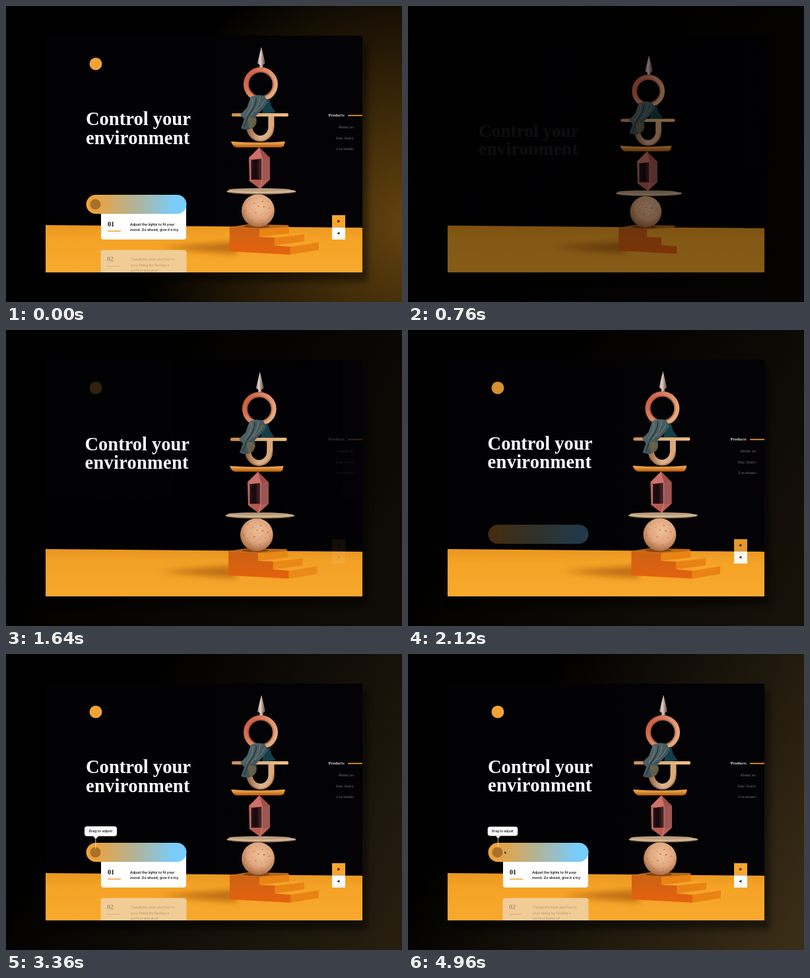
These frames come from a looping animation (600x450 px, 5000 ms). An HTML page:

```html
<!DOCTYPE html>
<html lang="en">
<head>
<meta charset="utf-8">
<title>Control your environment</title>
<style>
  html, body { margin: 0; width: 100%; height: 100%; overflow: hidden; background: #000; }
  svg { display: block; width: 600px; height: 450px; }
  .serif { font-family: "Liberation Serif", serif; font-weight: 700; }
  .sans { font: 600 5.3px Inter, sans-serif; }
  #nav { font-size: 5.6px; letter-spacing: .35px; }
  #title { font-size: 28.6px; fill: #fff; }
</style>
</head>
<body>
<svg viewBox="0 0 600 450">
  <defs>
    <clipPath id="screen"><rect x="60" y="45" width="480" height="360"/></clipPath>
    <radialGradient id="flareFill" gradientUnits="userSpaceOnUse" cx="610" cy="330" r="420">
      <stop stop-color="#64430f"/><stop offset=".4" stop-color="#64430f" stop-opacity=".6"/>
      <stop offset="1" stop-color="#64430f" stop-opacity="0"/>
    </radialGradient>
    <linearGradient id="glowFill" gradientUnits="userSpaceOnUse" x1="150" y1="120" x2="600" y2="400">
      <stop stop-color="#3a2d17" stop-opacity="0"/><stop offset="1" stop-color="#3a2d17"/>
    </linearGradient>
    <linearGradient id="night"><stop stop-color="#010102"/><stop offset="1" stop-color="#040308"/></linearGradient>
    <linearGradient id="floorFill" x2="0" y2="1">
      <stop stop-color="#e89620"/><stop offset=".12" stop-color="#f5a327"/><stop offset=".6" stop-color="#fbae33"/>
    </linearGradient>
    <linearGradient id="coneFill">
      <stop stop-color="#907c74"/><stop offset=".35" stop-color="#ead5c7"/><stop offset="1" stop-color="#51403c"/>
    </linearGradient>
    <linearGradient id="ringFill" x2="1" y2=".6">
      <stop stop-color="#c95338"/><stop offset=".45" stop-color="#dc8464"/><stop offset="1" stop-color="#e6a87c"/>
    </linearGradient>
    <linearGradient id="archFill">
      <stop stop-color="#a5764f"/><stop offset=".5" stop-color="#dcb48e"/><stop offset="1" stop-color="#dba77c"/>
    </linearGradient>
    <linearGradient id="plateFill">
      <stop stop-color="#cc8c50"/><stop offset=".5" stop-color="#dcae7c"/><stop offset="1" stop-color="#f0bf83"/>
    </linearGradient>
    <linearGradient id="trayFill" x2="0" y2="1">
      <stop stop-color="#f2b25e"/><stop offset=".5" stop-color="#dd8930"/><stop offset="1" stop-color="#a8560f"/>
    </linearGradient>
    <linearGradient id="clothFill" x2="1" y2="1"><stop stop-color="#5f7376"/><stop offset="1" stop-color="#2b3c40"/></linearGradient>
    <linearGradient id="coreFill"><stop stop-color="#2a1216"/><stop offset=".5" stop-color="#14090d"/><stop offset="1" stop-color="#5d2b2d"/></linearGradient>
    <radialGradient id="ballFill" cx=".55" cy=".38" r=".68">
      <stop stop-color="#efc19a"/><stop offset=".55" stop-color="#dfa780"/><stop offset="1" stop-color="#9c6038"/>
    </radialGradient>
    <linearGradient id="frontFill" x2="0" y2="1"><stop stop-color="#cc6216"/><stop offset="1" stop-color="#e5620e"/></linearGradient>
    <linearGradient id="sliderFill">
      <stop offset=".08" stop-color="#eda23c"/><stop offset=".5" stop-color="#afb49a"/><stop offset=".88" stop-color="#78cdfc"/>
    </linearGradient>
    <filter id="soft" x="-50%" y="-50%" width="200%" height="200%"><feGaussianBlur stdDeviation="5"/></filter>
  </defs>

  <g id="stage">
    <rect id="flare" width="600" height="450" fill="url(#flareFill)"/>
    <rect id="glow" width="600" height="450" fill="url(#glowFill)"/>
    <rect x="66" y="55" width="482" height="364" opacity=".45" filter="url(#soft)"/>
    <rect x="60" y="45" width="480" height="360"/>

    <g clip-path="url(#screen)">
      <g id="scene">
        <rect x="-200" y="-100" width="1100" height="600" fill="url(#night)"/>
        <path d="M-200 331L60 333 540 337 900 340V520H-200z" fill="url(#floorFill)"/>
        <path d="M350 358Q300 362 235 367 300 374 350 377z" fill="#a9590c" opacity=".7" filter="url(#soft)"/>

        <g id="treads">
          <path d="M384 339L429 335V347L384 351zM407 352L452 347V359L407 364zM431 366L474 359V371L431 378z" fill="#e98414"/>
          <path d="M384 351L407 352 452 347 429 346zM407 364L431 366 474 359 452 358z" fill="#f6a42b"/>
        </g>
        <path d="M339 336L384 339 428 336V333L366 332z" fill="#b9691a"/>
        <path d="M339 336L384 339V351L407 352V364L431 366V378L339 373z" fill="url(#frontFill)"/>
        <ellipse cx="380" cy="335" rx="20" ry="2.5" fill="#7b3a0c" opacity=".8"/>

        <circle cx="382" cy="311" r="25" fill="url(#ballFill)"/>
        <g id="specks" fill="#dd702b"></g>

        <ellipse cx="387" cy="282.5" rx="52.5" ry="4" fill="#80644c"/>
        <ellipse cx="387" cy="281.5" rx="52.5" ry="3.5" fill="#d3b792"/>
        <ellipse cx="384" cy="279.5" rx="47" ry="2.4" fill="#bb9e7f"/>

        <path d="M384 215L400 231V264L385 278 369 266 368 231z" fill="#b56059"/>
        <path d="M384 215L368 231 375 234zM375 234L384 215 389 233z" fill="#cf7068"/>
        <path d="M384 215L400 231 389 233z" fill="#a04e4b"/>
        <path d="M371 234L388 232V264L371 264z" fill="url(#coreFill)"/>
        <path d="M388 233L400 231V264L388 265z" fill="#9c5653"/>
        <path d="M371 264H388L385 278z" fill="#b9584e"/>
        <path d="M388 232V265L385 278M371 234V265" fill="none" stroke="#d9938a" stroke-width=".8"/>

        <path d="M369 166V184a16.5 17.5 0 0 0 33 0V166" fill="none" stroke="url(#archFill)" stroke-width="9"/>
        <path d="M365.500 168V184a20 21 0 0 0 40 0" fill="none" stroke="#7c5232" stroke-width="2" opacity=".45"/>
        <path d="M341 206Q382 209 423 206L421 213Q419 215 415 215H349Q344 214 341 206z" fill="url(#trayFill)"/>

        <circle cx="386" cy="119" r="22" fill="none" stroke="url(#ringFill)" stroke-width="8"/>
        <circle cx="386" cy="119" r="19" fill="none" stroke="#7a3322" stroke-width="2" opacity=".4"/>
        <path d="M387 62L393 87 389 90 390 93H384L385 90 381 87z" fill="url(#coneFill)"/>

        <path d="M391 143L399 141 402 152 409 162 388 164z" fill="#143f49"/>
        <rect x="342" y="163" width="86" height="5" rx="2" fill="url(#plateFill)"/>
        <path d="M371 138Q381 133 392 137L397 146 388 158 379 167Q382 178 373 186 366 190 356 186L361 172 355 165 365 155z" fill="url(#clothFill)"/>
        <path d="M366 170Q380 167 380 177 378 186 369 187z" fill="#806a42" opacity=".6"/>
        <path d="M373 140Q377 150 364 166M385 138Q385 151 371 166M392 143Q386 156 377 161" fill="none" stroke="#8fa0a0" stroke-width="1.2" opacity=".45"/>
        <path d="M379 139Q380 151 367 167M367 168L361 184" fill="none" stroke="#1a2c31" stroke-width="1.500" opacity=".75"/>
      </g>

      <g id="title" class="serif"><text x="121" y="181">Control your</text><text x="121" y="209.500" letter-spacing=".25">environment</text></g>

      <circle id="badge" cx="136" cy="88" r="9.500" fill="#f0a435"/>

      <g id="nav" class="serif" fill="#5d5b5c" text-anchor="end">
        <text x="513" y="167.800" fill="#f4f4f4">Products</text>
        <rect x="518" y="165.600" width="22" height="1.700" fill="#f2a22e"/>
        <text x="527.300" y="186">About us</text>
        <text x="527.300" y="202.500">Our Story</text>
        <text x="527.300" y="218.500">Locations</text>
      </g>

      <g id="arrows">
        <rect x="494" y="318" width="20" height="18.500" fill="#f7a52c"/>
        <rect x="494" y="336.500" width="20" height="18.500" fill="#fff"/>
        <path d="M501.800 325l4.600 2.300-4.600 2.300 1.200-2.300zM506 343.200l-4.600 2.300 4.600 2.300-1.200-2.300z"/>
      </g>

      <g id="card2">
        <rect x="143.500" y="371" width="130" height="45" rx="4" fill="#f1cc95"/>
        <text class="serif" x="153" y="388" font-size="10" fill="#ab9877">02</text>
        <rect x="153" y="395" width="19" height="1.200" fill="#cfb285"/>
        <g class="sans" fill="#c2a679">
          <text x="189" y="387">Tweak the look and feel to</text>
          <text x="189" y="395.600">your liking by finding a</text>
          <text x="189" y="404.200">perfect blend of</text>
        </g>
      </g>
      <g id="card1">
        <rect x="144" y="300" width="129" height="55" rx="4" fill="#fff"/>
        <text class="serif" x="154" y="334.500" font-size="10" fill="#111">01</text>
        <rect x="154" y="341.500" width="20" height="1.500" fill="#f2a22e"/>
        <g class="sans" fill="#151515">
          <text x="188" y="333.500">Adjust the lights to fit your</text>
          <text x="188" y="342.200">mood. Go ahead, give it a try.</text>
        </g>
      </g>
      <g id="slider">
        <rect x="121.500" y="287" width="152" height="29" rx="14.500" fill="url(#sliderFill)"/>
        <circle id="knob" cx="135.500" cy="301.500" r="8" fill="#a9702a"/>
      </g>
      <g id="tip">
        <path d="M135.800 278V296" stroke="#f3e4cc" stroke-width=".9"/>
        <path d="M132 277h8l-4 4z" fill="#fff"/>
        <rect x="119" y="262" width="49" height="15" rx="4" fill="#fff"/>
        <text class="sans" x="143.300" y="271.400" text-anchor="middle" fill="#222">Drag to adjust</text>
      </g>
    </g>
    <path id="cursor" d="M0 0V5.200L1.300 4.200 2.200 6 3.100 5.500 2.300 3.800H3.800z" fill="#111" stroke="#ddd" stroke-width=".5"/>
  </g>
</svg>
<script>
const $ = id => document.getElementById(id);
const LOOP = 5000;
const clamp = v => Math.max(0, Math.min(1, v));
const ramp = (t, from, to) => clamp((t - from) / (to - from));
const easeOut = p => 1 - (1 - p) ** 2;
const easeInOut = p => p < .5 ? 4 * p ** 3 : 1 - (2 - 2 * p) ** 3 / 2;
const zoomAt = (x, y, s) => `translate(${x} ${y}) scale(${s}) translate(${-x} ${-y})`;

function show(id, opacity, transform) {
  $(id).setAttribute('opacity', opacity);
  if (transform) $(id).setAttribute('transform', transform);
}
const rise = (id, p, distance) => show(id, p, `translate(0 ${distance * (1 - easeOut(p))})`);

// Freckles spiralling over the ball
for (let i = 1; i < 22; i++) {
  const r = 4.8 * Math.sqrt(i), a = i * 2.4;
  $('specks').innerHTML += `<ellipse cx="${382 + r * Math.cos(a)}" cy="${311 + r * Math.sin(a)}"
    rx="${.6 + i * 7 % 4 * .4}" ry="${.4 + i % 3 * .25}"/>`;
}

function render(now) {
  const time = now % LOOP;
  const opening = time < 80;
  const t = opening ? 2740 : time;

  show('stage', opening && time >= 40 ? .1 : 1);
  show('flare', opening ? 1 : 0);
  show('glow', opening ? 0 : ramp(t, 280, 4960));

  const zoom = 1 - .045 * Math.exp((760 - t) / 385);
  show('scene', easeOut(ramp(t, 280, 1780)), zoomAt(-100, 351, zoom));
  show('treads', ramp(t, 900, 1900));
  show('title', ramp(t, 710, 1680), zoomAt(-190, 572, zoom));

  show('badge', ramp(t, 1500, 2200));
  show('nav', ramp(t, 1500, 2100));
  show('arrows', ramp(t, 1600, 2160));

  rise('slider', ramp(t, 1980, 2500), 17);
  show('knob', ramp(t, 2200, 2520));
  rise('card1', ramp(t, 2200, 2620), 16);
  rise('card2', ramp(t, 2300, 2720), 16);

  const tip = ramp(t, 2760, 3000);
  const press = 1 - .07 * easeOut(ramp(t, 4640, 4900));
  show('tip', tip, `translate(0 ${9 * (1 - tip)}) ` + zoomAt(143.5, 270, press));

  const move = easeInOut(ramp(t, 3640, 4740));
  show('cursor', ramp(t, 3640, 3800), `translate(${560 - 414 * move} ${61 + 238 * move ** 2})`);
}

function frame() {
  render(performance.now());
  requestAnimationFrame(frame);
}
frame();
</script>
</body>
</html>
```
